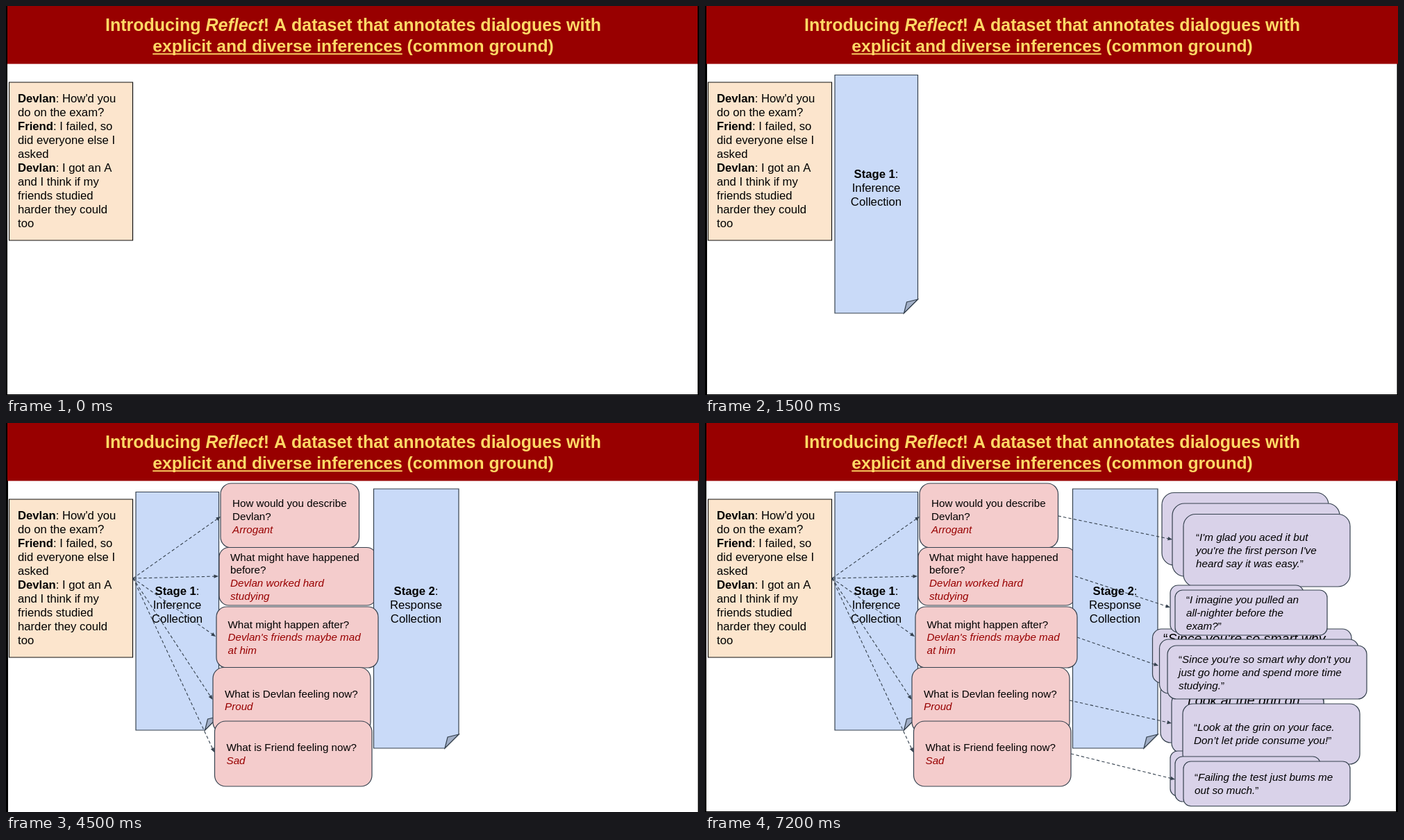
Write an HTML page with a canvas that moves like this. It is 998 px wide and 561 px high and loops after 8 s.

```html
<!DOCTYPE html>
<html lang="en">
<head>
<meta charset="utf-8">
<title>Dialogue inference slides</title>
<style>
  html, body { margin: 0; width: 100%; height: 100%; overflow: hidden; background: #000; }
  canvas { display: block; width: 998px; height: 561px; }
</style>
</head>
<body>
<canvas id="stage" width="998" height="561"></canvas>
<script>
const ctx = document.getElementById('stage').getContext('2d');
const LOOP = 8000;
const CUTS = [0, 1500, 3000, 4500, 6000];
const RED = '#980000', GOLD = '#ffd966', PEACH = '#fce5cd', BLUE = '#c9daf8';
const FOLD = '#a1aec6', PINK = '#f4cccc', LILAC = '#d9d2e9', LINE = '#36424f';

// Slide edges per step: left, right, bottom
const EDGES = [[2, 996, 560], [3, 996.5, 560], [3, 996.5, 560], [3, 996.5, 561], [2, 995, 560]];

// Draws runs of [text, style] one after another and returns the end x
function runs(x, y, size, color, parts) {
  ctx.fillStyle = color;
  ctx.textAlign = 'left';
  for (const [text, style] of parts) {
    ctx.font = `${style || ''} ${size}px "Liberation Sans", Arial, sans-serif`;
    ctx.fillText(text, x, y);
    x += ctx.measureText(text).width;
  }
  return x;
}

function runsWidth(size, parts) {
  let width = 0;
  for (const [text, style] of parts) {
    ctx.font = `${style || ''} ${size}px "Liberation Sans", Arial, sans-serif`;
    width += ctx.measureText(text).width;
  }
  return width;
}

function centered(cx, y, size, color, parts) {
  const x = cx - runsWidth(size, parts) / 2;
  runs(x, y, size, color, parts);
  return x;
}

function outline(fill, color = LINE, width = 1.2) {
  ctx.fillStyle = fill;
  ctx.fill();
  ctx.strokeStyle = color;
  ctx.lineWidth = width;
  ctx.stroke();
}

function polygon(points, fill) {
  ctx.beginPath();
  points.forEach(([x, y]) => ctx.lineTo(x, y));
  ctx.closePath();
  outline(fill);
}

function card(x, y, right, bottom, fill) {
  ctx.beginPath();
  ctx.roundRect(x, y, right - x, bottom - y, (bottom - y) / 6);
  outline(fill);
}

function arrow(x1, y1, x2, y2) {
  const angle = Math.atan2(y2 - y1, x2 - x1);
  ctx.strokeStyle = ctx.fillStyle = LINE;
  ctx.lineWidth = 1.1;
  ctx.setLineDash([4.4, 3.2]);
  ctx.beginPath();
  ctx.moveTo(x1, y1);
  ctx.lineTo(x2 - 5 * Math.cos(angle), y2 - 5 * Math.sin(angle));
  ctx.stroke();
  ctx.setLineDash([]);
  ctx.save();
  ctx.translate(x2, y2);
  ctx.rotate(angle);
  ctx.beginPath();
  ctx.moveTo(0, 0);
  ctx.lineTo(-6.5, -2.7);
  ctx.lineTo(-6.5, 2.7);
  ctx.fill();
  ctx.restore();
}

function paper(x, y, right, bottom, cx, title, word) {
  polygon([[x, y], [right, y], [right, bottom - 20], [right - 20, bottom], [x, bottom]], BLUE);
  polygon([[right - 20, bottom], [right - 16, bottom - 16], [right, bottom - 20]], FOLD);
  centered(cx, 248, 16.7, '#000', [[title, 'bold'], [':']]);
  centered(cx, 268, 16.7, '#000', [[word]]);
  centered(cx, 288, 16.7, '#000', [['Collection']]);
}

function question(x, y, right, bottom, tx, ty, lines, answers) {
  card(x, y, right, bottom, PINK);
  lines.concat(answers).forEach((text, i) => {
    const isAnswer = i >= lines.length;
    runs(tx, ty + i * 18.8, 15.2, isAnswer ? RED : '#000', [[text, isAnswer ? 'italic' : '']]);
  });
}

function reply(x, y, right, bottom, tx, ty, lines) {
  card(x, y, right, bottom, LILAC);
  lines.forEach((text, i) => {
    const parts = [[text, 'italic']];
    if (i === 0) parts.unshift(['“']);
    if (i === lines.length - 1) parts.push(['”']);
    runs(tx, ty + i * 18.8, 15.25, '#000', parts);
  });
}

function frame(step) {
  const [left, right, bottom] = EDGES[step];
  ctx.fillStyle = '#000';
  ctx.fillRect(0, 0, 998, 561);
  ctx.fillStyle = '#fff';
  ctx.fillRect(left, 83, right - left, bottom - 83);
  ctx.fillStyle = RED;
  ctx.fillRect(2, 0, (step ? 998 : 996) - 2, 83.5);

  centered(500, 36, 25, GOLD, [['Introducing ', 'bold'], ['Reflect', 'italic bold'],
    ['! A dataset that annotates dialogues with', 'bold']]);
  const link = ['explicit and diverse inferences', 'bold'];
  const x = centered(500, 66, 24.7, GOLD, [link, [' (common ground)', 'bold']]);
  ctx.fillRect(x, 68.3, runsWidth(24.7, [link]), 1.8);
}

function dialogue() {
  ctx.beginPath();
  ctx.rect(4.5, 110, 178, 228);
  outline(PEACH, '#111');
  const lines = [
    ['Devlan', ": How'd you"], ['', 'do on the exam?'], ['Friend', ': I failed, so'],
    ['', 'did everyone else I'], ['', 'asked'], ['Devlan', ': I got an A'],
    ['', 'and I think if my'], ['', 'friends studied'], ['', 'harder they could'], ['', 'too']
  ];
  lines.forEach(([name, text], i) => runs(17, 138.7 + i * 20, 16.7, '#000', [[name, 'bold'], [text]]));
}

function questions(step) {
  question(309, 87, 508.5, 180, 326, 121.3, ['How would you describe', 'Devlan?'], ['Arrogant']);
  question(307, 179.5, 533.5, 263, 323, 198.5, ['What might have happened', 'before?'],
    ['Devlan worked hard', 'studying']);
  if (step >= 3) paper(529.5, 95, 652, 469, 590.5, 'Stage 2', 'Response');
  question(303, 265, 536, 353, 319.5, 295.5, ['What might happen after?'],
    ["Devlan's friends maybe mad", 'at him']);
  question(298, 352.5, 525, 447, 315, 395.5, ['What is Devlan feeling now?'], ['Proud']);
  question(300.5, 430, 527, 524, 317.5, 472.8, ['What is Friend feeling now?'], ['Sad']);
  [[309, 135], [306, 221], [302, 308], [297.5, 399], [300, 475]]
    .forEach(([x, y]) => arrow(183, 224, x, y));
}

function replies() {
  card(658, 100.5, 898, 205, LILAC);
  card(673, 116, 914, 221, LILAC);
  reply(689, 131.5, 929, 236, 707, 170.3,
    ["I'm glad you aced it but", "you're the first person I've", 'heard say it was easy.']);

  card(656, 374, 891, 461, LILAC);
  card(672, 389, 891, 476, LILAC);
  runs(695, 406.5, 19.5, '#000', [['Look at the grin on', 'italic']]);
  card(670, 473, 879, 538, LILAC);
  reply(688, 405, 943, 492, 704, 444.3,
    ['Look at the grin on your face.', 'Don’t let pride consume you!']);
  card(677, 481, 886, 546, LILAC);
  reply(689, 488, 929, 552.5, 705, 516.3, ['Failing the test just bums me', 'out so much.']);

  card(644.5, 297, 931, 375, LILAC);
  runs(660, 318, 19.5, '#000', [['“'], ["Since you're so smart why", 'italic']]);
  card(670, 234, 862, 302, LILAC);
  card(654.5, 312, 941, 390, LILAC);
  reply(677, 241, 896, 306, 693, 260,
    ['I imagine you pulled an', 'all-nighter before the', 'exam?']);
  reply(666, 321, 953, 398, 682, 346.3,
    ["Since you're so smart why don't you", 'just go home and spend more time', 'studying.']);

  arrow(508.5, 134, 673, 168);
  arrow(533, 221, 670, 266);
  arrow(536, 309, 653, 350);
  arrow(525, 400, 672, 433);
  arrow(527, 477, 677, 514);
}

function draw(step) {
  frame(step);
  dialogue();
  if (step >= 1) paper(187, 99.5, 306.5, 443, 246.5, 'Stage 1', 'Inference');
  if (step >= 2) questions(step);
  if (step >= 4) replies();
}

const start = performance.now();
function tick() {
  const time = (performance.now() - start) % LOOP;
  draw(CUTS.filter(cut => cut <= time).length - 1);
  requestAnimationFrame(tick);
}
tick();
</script>
</body>
</html>
```
